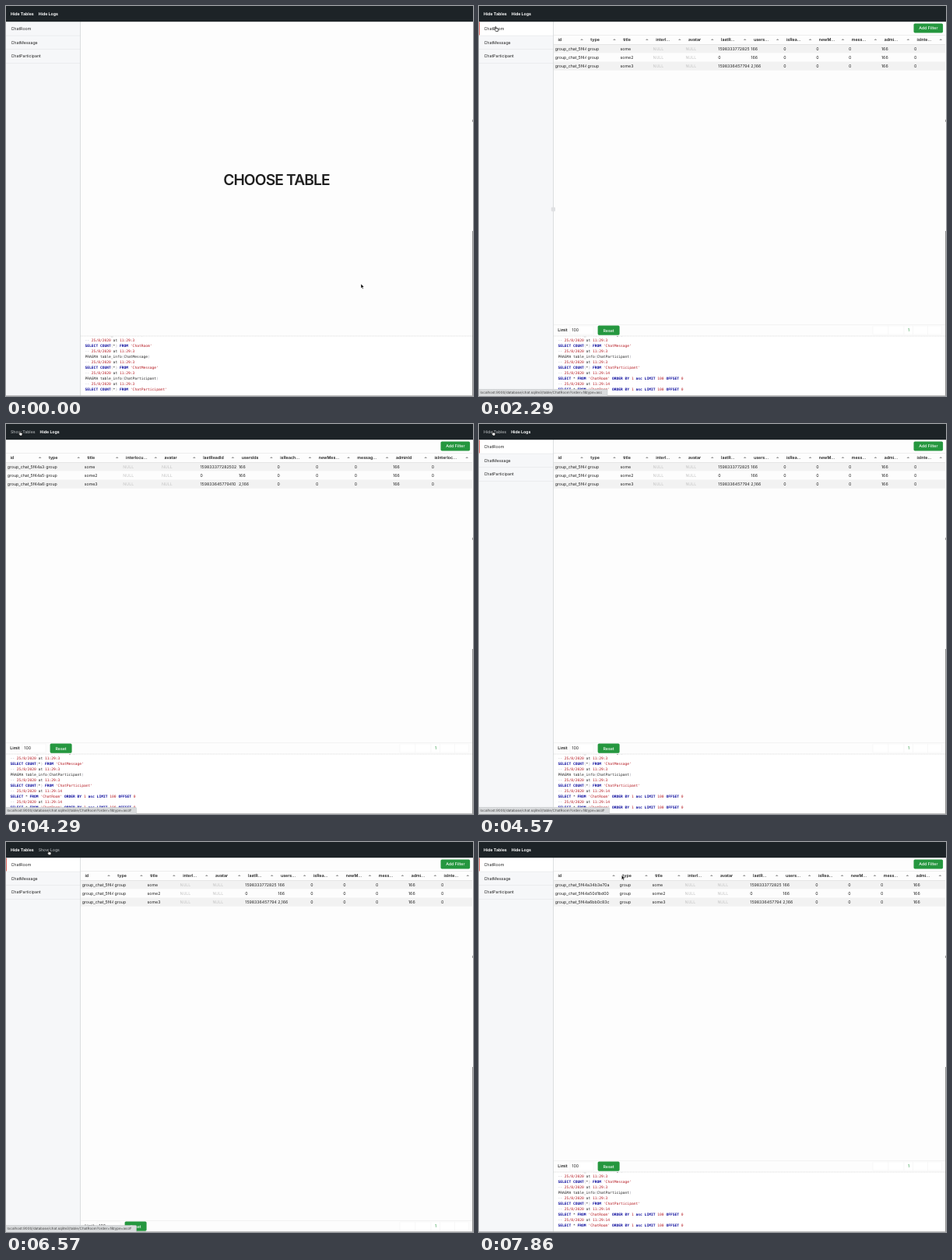
Animation of 600x501 px, one loop 8 s. Source, as an HTML page:

```html
<!DOCTYPE html>
<html lang="en">
<head>
<meta charset="utf-8">
<title>Database browser</title>
<style>
  html, body { margin: 0; width: 100%; height: 100%; overflow: hidden; background: #fdfdfd; }
  svg { display: block; }
  text { font: 5.25px Inter, "Open Sans", sans-serif; fill: #1f1f1f; text-rendering: geometricPrecision; white-space: pre; }
  .bold { font-weight: 600; }
  .nav { font-size: 5.2px; font-weight: 700; fill: #fff; }
  .nav .hover { font-weight: 500; fill: #aeb2b5; }
  .title { font-size: 19.2px; font-weight: 600; letter-spacing: -.85px; text-anchor: middle; }
  .null { fill: #c4c4c4; }
  .btn { fill: #fff; font-weight: 500; text-anchor: middle; }
  .page { fill: #28963f; text-anchor: middle; }
  .status { font-size: 4.5px; fill: #444; }
  .log { font: 4.61px "DejaVu Sans Mono", monospace; fill: #222; }
  .kw { font-weight: 700; fill: #0a0a9c; }
  .lit { fill: #b3161e; }
  .dim { fill: #9a9aa6; }
</style>
</head>
<body>
<svg id="stage" width="600" height="501" viewBox="0 0 600 501"></svg>
<script>
const LOOP = 8000, TICK = 1000 / 7;
const stage = document.getElementById('stage');

const rect = (x, y, w, h, fill, more = '') =>
  `<rect x="${x}" y="${y}" width="${w}" height="${h}" fill="${fill}" ${more}/>`;
const text = (x, y, s, cls = '') => `<text x="${x}" y="${y}" class="${cls}">${s}</text>`;
const clip = (x, y, w, h, body) => `<svg x="${x}" y="${y}" width="${w}" height="${h}">${body}</svg>`;
const span = (cls, s) => `<tspan class="${cls}">${s}</tspan>`;
const button = (x, y, w, h, s) =>
  rect(x, y, w, h, '#25973f', 'rx="1.6"') + text(x + w / 2, y + h / 2 + 1.9, s, 'btn');

const tables = ['ChatRoom', 'ChatMessage', 'ChatParticipant'];

// narrow heading, wide heading, cells
const columns = [
  ['id', 'id', ['group_chat_5f44a34b3e70a', 'group_chat_5f44a50d1bd00', 'group_chat_5f44a6bb0c83c']],
  ['type', 'type', 'group'],
  ['title', 'title', ['some', 'some2', 'some3']],
  ['interl...', 'interlocu...', 'NULL'],
  ['avatar', 'avatar', 'NULL'],
  ['lastR...', 'lastReadId', ['159833377282502', '0', '159833645779410']],
  ['users...', 'usersIds', ['166', '166', '2,166']],
  ['isRea...', 'isReach...', '0'],
  ['newM...', 'newMes...', '0'],
  ['mess...', 'messag...', '0'],
  ['admi...', 'adminId', '166'],
  ['isInte...', 'isInterloc...', '0']
];

const stamp = s => `-- 25/8/2020 at 11:29:${s}`;
const select = "SELECT * FROM 'ChatRoom' ORDER BY 1 asc LIMIT 100 OFFSET 0";
const startLog = tables.flatMap(t =>
  [stamp(3), `PRAGMA table_info(${t})`, stamp(3), `SELECT COUNT(*) FROM '${t}'`]);
const fullLog = [...startLog, stamp(14), select, stamp(14), select];

const TOKEN = /('\w+')|(\b(?:SELECT|COUNT|FROM|ORDER|BY|asc|LIMIT|OFFSET)\b)|(\d[\d\/:]*)|(--|[()])/g;
const paint = line => line.replace(TOKEN, (s, str, kw, num) =>
  span(str || num ? 'lit' : kw ? 'kw' : 'dim', s));

function logs(x, lines) {
  const body = lines.slice(-11).map((l, i) => text(5.5, .2 + i * 6.93, paint(l), 'log')).join('');
  return clip(x, 424, 600 - x, 77, rect(0, 0, 600, 77, '#fff') + body) +
    `<path d="M${x} 424H599" stroke="#c9c9c9" stroke-width=".6" stroke-dasharray="1.2 .8"/>`;
}

function grid(x, wide, grow) {
  const pitch = wide ? 49.55 : 41.93;
  let out = rect(x, 37, 599 - x, .5, '#dcdcdc') + rect(x, 49.2, 599 - x, 11.2, '#f2f2f2') +
    rect(x, 71.5, 599 - x, 11.2, '#f2f2f2') + rect(x, 49, 599 - x, .5, '#d8d8d8');
  columns.forEach(([short, long, cells], i) => {
    const left = x + i * pitch + (i ? grow : 0);
    const w = wide && i == 11 ? 53 : pitch + (i ? 0 : grow);
    let body = text(5.4, 8, wide ? long : short, 'bold') +
      `<path d="M${w - 7.8} 7 l1.9-1.9 1.9 1.9z" fill="#9b9b9b"/>`;
    for (let r = 0; r < 3; r++) {
      const cell = Array.isArray(cells) ? cells[r] : cells;
      body += text(1.7, 19.8 + r * 11.1, cell, cell == 'NULL' ? 'null' : '');
    }
    if (left < 599) out += clip(left, 37, Math.min(w, 599 - left), 46, body);
  });
  return out;
}

function footer(x, y) {
  let out = rect(x, y, 599 - x, .5, '#e6e6e6') + text(x + 5.3, y + 9.4, 'Limit', 'bold') +
    rect(x + 21, y + 2, 30, 11, '#fff', 'stroke="#f0f0f0" stroke-width=".5"') +
    text(x + 23.3, y + 9.4, '100') + button(x + 56.6, y + 1.5, 28, 12.2, 'Reset');
  for (const [px, w] of [[506, 20], [526, 20], [546, 11.5], [557.5, 19], [576.5, 18]])
    out += rect(px, y + 2, w, 11, '#fff', 'stroke="#f3f3f3" stroke-width=".5"');
  return out + text(552, y + 9.4, '1', 'page');
}

function sidebar(active, handle) {
  let out = rect(0, 20, 95.5, 481, '#f6f7f9');
  if (active) out += rect(0, 20, 95.5, 18, '#fff') + rect(0, 20.5, .9, 17, '#dc5a50');
  tables.forEach((t, i) => {
    out += text(6.5, 31.1 + i * 17.6, t) + rect(0, 37.8 + i * 17.6, 95.5, .5, '#dfe1e4');
  });
  out += rect(95.2, 20, .7, 481, '#cfd1d3');
  return handle ? out + rect(92.8, 258.5, 5.2, 5.2, '#dfe0e2', 'rx="1"') : out;
}

const status = hash => rect(-1, 492.5, hash ? 168.5 : 166, 10, '#d9dbdd', 'rx="1" stroke="#bfc1c3" stroke-width=".5"') +
  text(1.5, 498.4, 'localhost:9000/database/chat.sqlite3/table/ChatRoom?order=1&amp;type=asc' + (hash ? '#' : ''), 'status');

const ARROW = '<path d="M0 0V5.6L1.3 4.4 2.2 6.5 3.2 6 2.3 4H4.1Z" fill="#000" stroke="#fff" stroke-width=".5"/>';
const HAND = '<path d="M1.2.5Q1.7-.2 2.1.5V2.4L4.6 2.9Q5.2 3.1 5 4L4.5 6.4H1.9L.1 3.9Q.3 3.2 1.2 3.8Z" fill="#fff" stroke="#111" stroke-width=".7"/>';

const ease = u => u * u * (3 - 2 * u);
// tick, x, y: the pointer rests or glides between these
const path = [[0, 456, 357], [6, 20.5, 29.5], [15, 20.5, 29.5], [19, 16, 8.6], [31, 16, 8.6],
  [34, 51, 10.3], [36, 53, 10.3], [46, 53, 10.3], [51, 142, 42], [52, 142, 42], [55, 183.3, 42.8]];

function pointer(k) {
  const n = Math.max(1, path.findIndex(p => p[0] >= k));
  const [a, b] = [path[n - 1], path[n]];
  const u = ease(Math.min(1, (k - a[0]) / (b[0] - a[0])));
  return [a[1] + (b[1] - a[1]) * u, a[2] + (b[2] - a[2]) * u];
}

function render(k) {
  const [cx, cy] = pointer(k);
  const open = k >= 13, wide = k >= 24 && k < 31, noLogs = k >= 39 && k < 46;
  const x = wide ? 0 : 96, grow = k > 52 ? Math.max(0, cx - 142.3) : 0;
  const overNav = cy < 19, overSide = !overNav && cx < 95;
  const hoverTables = overNav && cx < (wide ? 39 : 36), hoverLogs = overNav && cx > 42 && cx < 70;

  let out = rect(0, 0, 600, 501, '#fdfdfd');
  out += open
    ? button(558.5, 22.4, 37.6, 12, 'Add Filter') + grid(x, wide, grow) + footer(x, noLogs ? 486 : 409)
    : text(347.5, 229.7, 'CHOOSE TABLE', 'title');
  if (!noLogs) out += logs(x, open ? fullLog : startLog);
  if (!wide) out += sidebar(open, overSide);
  out += rect(0, 0, 600, 20.2, '#1d2327') + text(6, 12.4,
    span(hoverTables ? 'hover' : '', (wide ? 'Show' : 'Hide') + ' Tables') +
    `<tspan dx="6" class="${hoverLogs ? 'hover' : ''}">${noLogs ? 'Show' : 'Hide'} Logs</tspan>`, 'nav');
  out += rect(599.2, 146, .8, 3, '#888') + rect(599.2, 289, .8, 212, '#777') + rect(0, 500.3, 600, .7, '#a5a5a5');
  if (k >= 8 && k < 48) out += status(k >= 18);
  const hand = overSide && cy < 73 || hoverTables || hoverLogs;
  stage.innerHTML = out + `<g transform="translate(${cx} ${cy})">${hand ? HAND : ARROW}</g>`;
}

let shown = -1;
const start = performance.now();
function frame() {
  const k = Math.floor((performance.now() - start) % LOOP / TICK);
  if (k !== shown) render(shown = k);
  requestAnimationFrame(frame);
}
frame();
</script>
</body>
</html>
```
